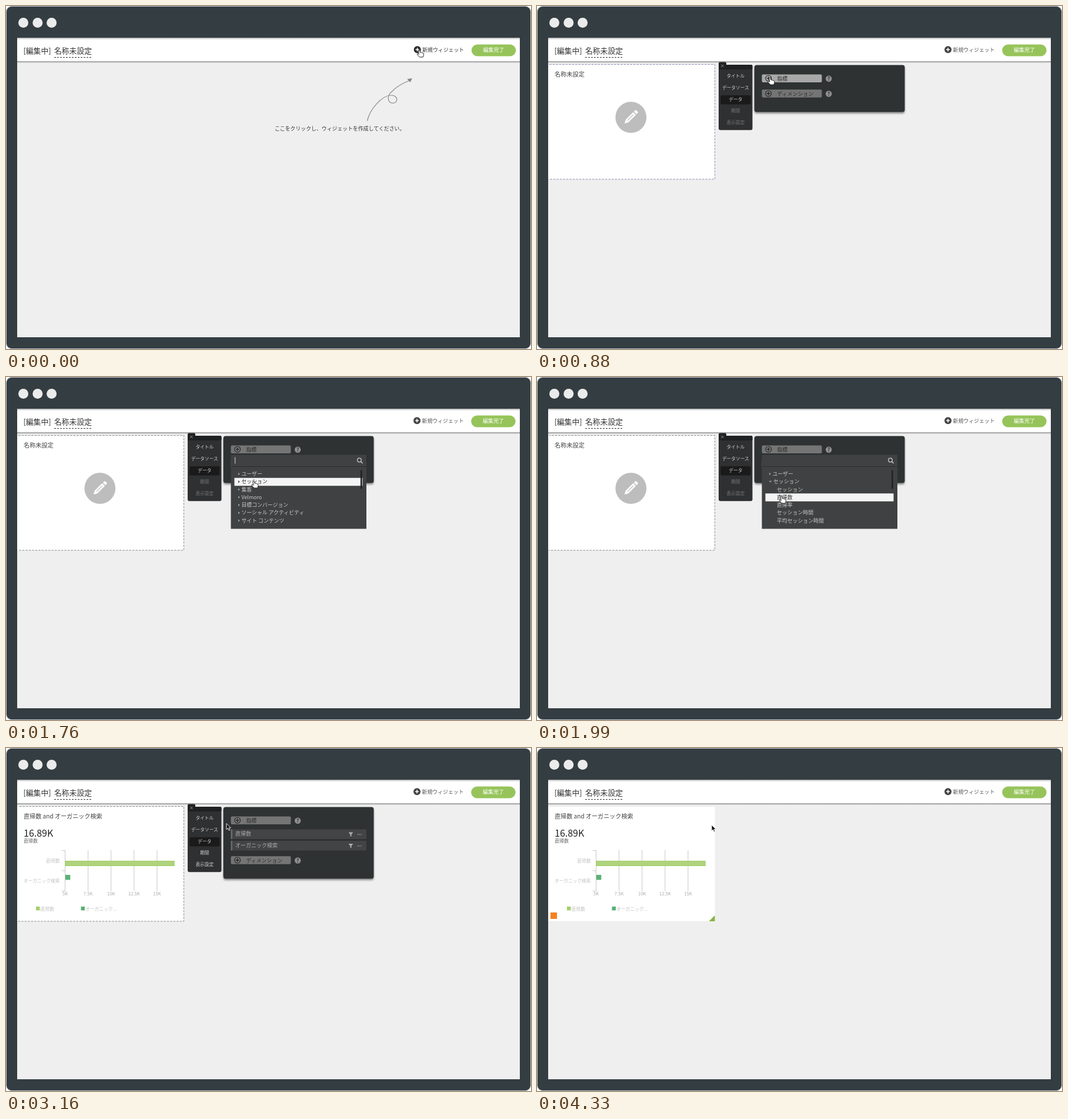
An HTML page that plays this animation: 893x584 px, repeating every 5.3 s.

```html
<!DOCTYPE html>
<html lang="ja">
<head>
<meta charset="utf-8">
<title>ウィジェット作成</title>
<style>
html, body { margin: 0; width: 100%; height: 100%; overflow: hidden; background: #fff; }
svg { display: block; }
text { font-family: "Noto Sans CJK JP", "Noto Sans CJK", sans-serif; white-space: pre; }
</style>
</head>
<body>
<svg id="stage" width="893" height="584" viewBox="0 0 893 584"></svg>
<script>
const LOOP = 5300;

const rect = (x, y, w, h, fill, r = 0, more = '') =>
  `<rect x="${x}" y="${y}" width="${w}" height="${h}" rx="${r}" fill="${fill}" ${more}/>`;
const circle = (x, y, r, fill, more = '') => `<circle cx="${x}" cy="${y}" r="${r}" fill="${fill}" ${more}/>`;
const line = (d, stroke, w = 1, more = '') =>
  `<path d="${d}" fill="none" stroke="${stroke}" stroke-width="${w}" ${more}/>`;
const shape = (d, fill, more = '') => `<path d="${d}" fill="${fill}" ${more}/>`;
const text = (x, y, size, fill, str, anchor = 'start') =>
  `<text x="${x}" y="${y}" font-size="${size}" fill="${fill}" text-anchor="${anchor}">${str}</text>`;
const group = (content, opacity = 1, x = 0, y = 0, rot = 0) => opacity <= 0 ? '' :
  `<g opacity="${opacity}" transform="translate(${x} ${y}) rotate(${rot})">${content}</g>`;

const DEFS = `<defs>
  <filter id="shadow" x="-10%" y="-10%" width="120%" height="130%">
    <feDropShadow dx="0" dy="2.5" stdDeviation="1.5" flood-opacity=".42"/></filter>
  <filter id="glow" x="-5%" y="-5%" width="110%" height="110%">
    <feDropShadow dx="0" dy="0" stdDeviation="1.2" flood-color="#8c9be0" flood-opacity=".75"/></filter>
  <linearGradient id="edge" x2="0" y2="1"><stop stop-color="#939393"/><stop offset="1" stop-color="#efefef"/></linearGradient>
  <linearGradient id="top" x2="0" y2="1"><stop stop-color="#b4b4b4"/><stop offset="1" stop-color="#fff"/></linearGradient>
  <clipPath id="page"><rect x="19" y="54" width="855" height="510"/></clipPath>
</defs>`;

const DARK = '#2f3031';
const TOP_LIST = ['ユーザー', 'セッション', '集客', 'Velmoro', '目標コンバージョン', 'ソーシャル アクティビティ', 'サイト コンテンツ'];
const OPEN_LIST = ['ユーザー', 'セッション', 'セッション', '直帰数', '直帰率', 'セッション時間', '平均セッション時間'];

const frame = () =>
  rect(.5, .5, 892, 583, '#343d41', 9, 'stroke="#c3ccd4"') +
  [29.5, 53.8, 77.6].map(x => circle(x, 28.5, 8.5, '#ebebeb')).join('') +
  rect(19, 54, 855, 510, '#efefef');

function header(s) {
  const plus = line('M696.1 74.3h6M699.1 71.3v6', '#fff', 1.6);
  return rect(19, 54, 855, 41, '#fff') + rect(19, 54, 855, 3.5, 'url(#top)') +
    rect(19, 94, 855, 3.5, 'url(#edge)') +
    group(text(29.5, 81, 12.8, '#333', '[編集中]') + text(82, 81, 12.8, '#333', '名称未設定') +
      line('M82 87.5H146', '#333', 1, 'stroke-dasharray="3 2"'), 1, s.left) +
    group(circle(699.1, 74.3, 6, s.right ? '#2b2b2b' : '#444') + plus +
      text(707.6, 78, 8.9, s.right ? '#333' : '#555', '新規ウィジェット') +
      rect(791.2, 65.5, 75.5, 20, '#96c45a', 10) +
      text(829, 78, 9, '#fff', '編集完了', 'middle'), 1, s.right);
}

const intro = () =>
  line('M614.5 195.5C619 175 640 152 655 152C667 152 668 165 658 165.5C648 165 648 152 656 146Q666 135 686 127', '#888', 1.2) +
  shape('M691 123L682.5 124.2L687.5 130Z', '#888') +
  text(457, 212, 8.9, '#333', 'ここをクリックし、ウィジェットを作成してください。');

const pencil = () =>
  circle(159.8, 189.5, 26.4, '#bdbdbd') +
  group(shape('M-3.2 -9H3.2V9L0 15L-3.2 9Z', '#fff') + rect(-3.2, -15, 6.4, 4.5, '#fff', 1.5) +
    line('M0 -6V8', '#bdbdbd', 1.2), 1, 159.5, 189.5, 45);

function gear(x, y, r, rot) {
  let teeth = '';
  for (let i = 0; i < 32; i++) {
    const a = i * Math.PI / 16, q = i % 4 < 2 ? r : r * .76;
    teeth += `${i ? 'L' : 'M'}${(q * Math.cos(a)).toFixed(2)} ${(q * Math.sin(a)).toFixed(2)}`;
  }
  return group(line(teeth + 'Z', '#aaa', .9) + circle(0, 0, r * .34, 'none', 'stroke="#aaa" stroke-width=".9"'), 1, x, y, rot);
}

function chart(grow) {
  let out = '';
  ['5K', '7.5K', '10K', '12.5K', '15K'].forEach((label, i) => {
    const x = 100.5 + i * 39.1;
    out += line(`M${x} 174V243.5`, '#c8c8c8') + text(x, 251, 7.6, '#aaa', label, 'middle');
  });
  return out + line('M94.5 174.5h6M94.5 209h6M94.5 243.5h6', '#c8c8c8') +
    text(91.5, 195, 7.8, '#c2c2c2', '直帰数', 'end') +
    text(91.5, 229, 7.7, '#c2c2c2', 'オーガニック検索', 'end') +
    rect(101, 192.5, 185.2 * grow, 8, '#afd37c', 0, 'stroke="#a2cb69"') +
    rect(101, 216, 8.3 * grow, 8.5, '#58b275') +
    rect(51, 270, 6.5, 6.5, '#a5cf6c') + text(58.5, 277, 7.8, '#c2c2c2', '直帰数') +
    rect(127.5, 270, 6.5, 6.5, '#58b275') + text(135, 277, 7.8, '#c2c2c2', 'オーガニック...');
}

function widget(s) {
  const border = s.ants
    ? line('M21 99.5H302.5V295H20', s.glow ? '#8a8fb5' : '#8c8c8c', 1,
      `stroke-dasharray="3.5 2" stroke-dashoffset="${-s.step * 1.4}"`)
    : '';
  return rect(10, 100, 292.5, 194.7, '#fff', 0, s.glow && !s.ants ? 'filter="url(#glow)"' : '') + border +
    group(text(30, 119.5, 10.2, '#444', '名称未設定') + pencil(), 1 - s.result) +
    group(text(30, 119.5, 10.1, '#444', '直帰数 and オーガニック検索') +
      text(30, 151, 16, '#222', '16.89K') + text(30, 161, 8, '#666', '直帰数'), s.result) +
    (s.gears ? group(gear(155, 192.5, 8, s.spin) + gear(166.5, 200, 6.2, -s.spin), s.result) : '') +
    (s.chart ? chart(s.chart) : '') +
    group(rect(23, 280, 11, 11, '#f58220') + shape('M302.5 285V295H292.5Z', '#86b440'), s.done);
}

function menu(s) {
  const items = ['タイトル', 'データソース', 'データ', '期間', '表示設定'];
  return rect(309, 95.5, 13, 14, '#1f2021', 2) + rect(309, 100, 57.5, 111.3, DARK, 3) +
    rect(309, 100, 57.5, 8, '#1f2021', 2) +
    line('M313.2 99.7l4.4 4.4m0 -4.4l-4.4 4.4', '#aaa', .8) +
    (s.data ? rect(312, 152, 51.5, 15.5, '#1a1a1a', 2) : '') +
    items.map((t, i) => text(337.8, 122 + i * 19.8, 7.7, s.dim && i > 2 ? '#777' : '#d0d0d0', t, 'middle')).join('');
}

const addButton = (y, label, hot) =>
  rect(382.5, y - 6.7, 102, 13.5, hot ? '#a8a8a8' : '#757575', 2) +
  circle(393.7, y, 5, 'none', 'stroke="#252525" stroke-width="1.1"') +
  line(`M390.7 ${y}h6m-3 -3v6`, '#252525', 1.3) +
  text(408.5, y + 3.5, 8.9, '#2b2b2b', label) +
  circle(496.2, y + .5, 5.2, '#909090') +
  `<g font-weight="bold">${text(496.2, y + 3.6, 8.5, DARK, '?', 'middle')}</g>`;

const panelBox = h => rect(369.7, 100.5, 255.8, h, DARK, 4, 'filter="url(#shadow)"');

const metricRow = (y, label) =>
  rect(382.5, y, 230.5, 16.5, '#434445') + rect(382.5, y, 2.5, 16.5, '#6a6b6b') +
  text(390, y + 10.5, 9, '#aaa', label) +
  shape(`M582.5 ${y + 5}h8l-3 3.5v4l-2 -1.2v-2.8Z`, '#b0b0b0') +
  [598.5, 601.2, 603.9].map(x => circle(x, y + 8.7, .8, '#b0b0b0')).join('');

function dropdown(s) {
  const list = s.open ? OPEN_LIST : TOP_LIST;
  let out = rect(382.5, 132.5, 230.5, 126, '#404142') + line('M382.5 152.5H613', '#2c2d2e') +
    circle(601, 141.5, 3.3, 'none', 'stroke="#ccc" stroke-width="1.3"') + line('M603.5 144l3 3', '#ccc', 1.5) +
    (s.open ? '' : line('M389.7 136.5V147.5', '#ddd'));
  list.forEach((label, i) => {
    const y = 165 + i * 13.25, on = i === s.hover;
    const sub = s.open && i > 1, parent = s.open && i === 1;
    if (on) out += rect(388.5, y - 6.5, 218, 13.5, '#f4f4f4');
    if (!sub) out += shape(parent ? `M394.5 ${y - 1.5}h5l-2.5 3Z` : `M395 ${y - 2.3}v4.6l3 -2.3Z`, on ? '#555' : '#999');
    out += text(sub ? 408 : parent ? 402 : 400.5, y + 3, 8.9, on ? '#333' : '#c8c8c8', label);
  });
  return out + rect(603, 158.5, 2.6, 32, '#222', 1);
}

const panel = s =>
  panelBox(80) + addButton(123.2, '指標', s.hot) + addButton(149, 'ディメンション') +
  group(panelBox(122) + addButton(123.2, '指標') + metricRow(138.5, '直帰数') +
    metricRow(158, 'オーガニック検索') + addButton(191, 'ディメンション'), s.result) +
  group(dropdown(s), s.drop, 0, s.slide);

function cursor([kind, x, y]) {
  const pic = kind === 'hand'
    ? shape('M-1 1.2C-1 -.5 1.2 -.5 1.4 1L2 4.2C3 3.3 4 3.7 4.2 4.6C5.2 4 6 4.5 6.2 5.3C7.3 5 8 5.6 8 6.6L7.7 9.5L6.7 12H1L-3 7.8C-3.8 6.6 -2.5 5.7 -1.3 6.6L-.3 7.4Z',
      '#fff', 'stroke="#222" stroke-width="1" stroke-linejoin="round"')
    : shape('M0 0V10.2L2.4 8L4 11.8L5.8 11L4.2 7.4H7.3Z', '#111', 'stroke="#fff" stroke-width=".9"');
  return group(pic, 1, x, y);
}

// The two panels overlap, so the base one is dropped once the result covers it.
const draw = s => DEFS + frame() +
  `<g clip-path="url(#page)">${group(widget(s), s.widget, s.left / 2)}${header(s)}${group(intro(), s.intro)}` +
  `${group(menu(s) + (s.result === 1 ? resultPanel() : panel(s)), s.panel, s.left / 2)}</g>` + cursor(s.cursor);

const resultPanel = () =>
  panelBox(122) + addButton(123.2, '指標') + metricRow(138.5, '直帰数') +
  metricRow(158, 'オーガニック検索') + addButton(191, 'ディメンション');

// Each step changes the state left by the one before it.
const steps = [
  [0, { left: 0, right: .6, intro: 1, widget: 0, panel: 0, result: 0, done: 0, drop: 0, slide: 0, spin: 0, cursor: ['hand', 702.5, 75] }],
  [230, { left: 1, intro: .4, widget: .6, panel: .6, glow: true, cursor: ['arrow', 560, 108] }],
  [360, { intro: 0, widget: 1, panel: 1, cursor: ['arrow', 413, 142.5] }],
  [620, { ants: true, data: true, dim: true, cursor: ['arrow', 404, 132] }],
  [880, { left: 0, right: 0, hot: true, cursor: ['hand', 396, 122] }],
  [1050, { cursor: ['hand', 396, 121.5] }],
  [1390, { drop: .62, slide: -5, hover: 0, cursor: ['hand', 422.5, 162] }],
  [1590, { drop: 1, slide: 0, hot: false, glow: false, cursor: ['hand', 422.5, 165] }],
  [1760, { hover: 1, cursor: ['hand', 421, 177] }],
  [1830, { open: true }],
  [1910, { hover: 2, cursor: ['hand', 418, 190] }],
  [1990, { hover: 3, cursor: ['hand', 415.5, 203] }],
  [2160, { ants: false, drop: .5, result: .5, gears: true, dim: false, cursor: ['arrow', 395, 165] }],
  [2330, { drop: 0, result: 1, cursor: ['arrow', 375, 128.5] }],
  [2530, { spin: 22 }],
  [2760, { gears: false, ants: true, chart: .5 }],
  [2990, { chart: .85 }],
  [3160, { chart: 1 }],
  [3390, {}],
  [3560, {}],
  [3730, { cursor: ['arrow', 345, 130] }],
  [3930, { panel: .5, cursor: ['arrow', 297, 131] }],
  [4330, { panel: 0, ants: false, done: 1 }]
];

let state = {};
const states = steps.map(([at, change], step) => state = { ...state, ...change, at, step });
const stage = document.getElementById('stage');
let shown;

function tick() {
  const t = performance.now() % LOOP;
  const now = states.findLast(s => s.at <= t);
  if (now !== shown) stage.innerHTML = draw(shown = now);
  requestAnimationFrame(tick);
}
tick();
</script>
</body>
</html>
```
